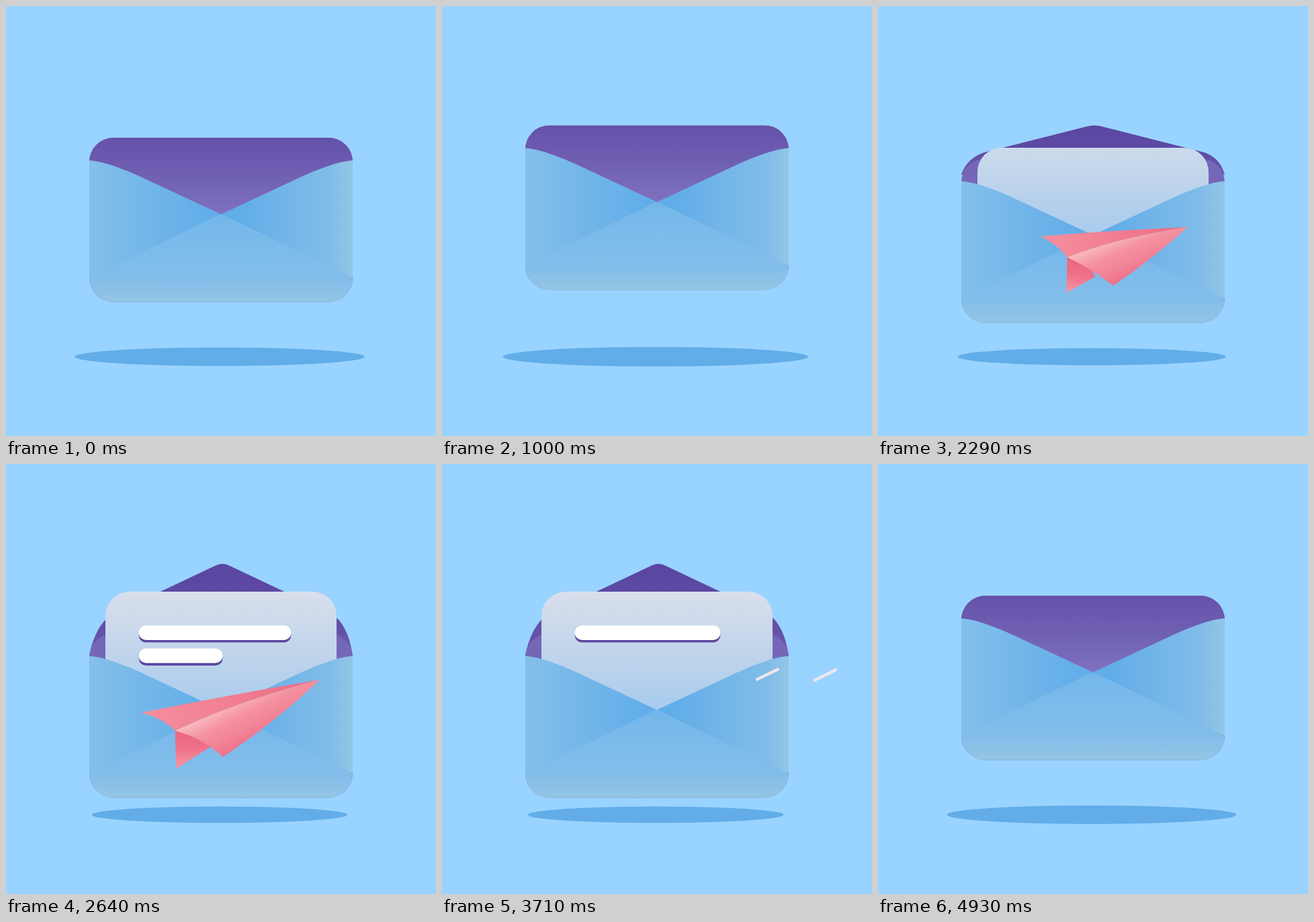
Recreate the animation shown at these times as an HTML page with a canvas. Size 640 by 640 pixels, loop 5000 ms.

```html
<!DOCTYPE html>
<html lang="en">
<head>
<meta charset="utf-8">
<title>Envelope and paper plane</title>
<style>
html, body { margin: 0; width: 100%; height: 100%; overflow: hidden; background: #99d3ff; }
canvas { display: block; width: 100vmin; height: 100vmin; }
</style>
</head>
<body>
<canvas id="stage" width="640" height="640"></canvas>
<script>
const ctx = document.getElementById('stage').getContext('2d');
const LOOP = 5000, STEP = LOOP / 70;
const LEFT = 124, RIGHT = 516, TOP = -114, BOTTOM = 130.5, RADIUS = 36;
const HINGE = -101, PEAK = -217.5;

const ramp = (t, from, to) => Math.min(1, Math.max(0, (t - from) / (to - from)));
const smooth = u => u * u * (3 - 2 * u);
const ease = (t, from, to) => smooth(ramp(t, from, to));
const easeOut = (t, from, to) => 1 - (1 - ramp(t, from, to)) ** 3;

function gradient(x0, y0, x1, y1, ...stops) {
  const g = ctx.createLinearGradient(x0, y0, x1, y1);
  stops.forEach((s, i) => g.addColorStop(i / (stops.length - 1), s));
  return g;
}

function fill(path, style) {
  ctx.fillStyle = style;
  ctx.fill(path instanceof Path2D ? path : new Path2D(path));
}

function roundRect(x, y, w, h, r) {
  const p = new Path2D();
  p.roundRect(x, y, w, h, r);
  return p;
}

function at(x, y, draw) {
  ctx.save();
  ctx.translate(x, y);
  draw();
  ctx.restore();
}

// The envelope's origin is the point where its front folds meet.
const body = roundRect(LEFT, TOP, RIGHT - LEFT, BOTTOM - TOP, RADIUS);
const leftSide = 'M124 -80 C136 -80 160 -74 200 -56 L320 0 L124 95 Z';
const rightSide = 'M516 -80 C504 -80 480 -74 440 -56 L320 0 L516 95 Z';
const bottomSide = 'M320 0 L509 91 Q515 94 516 97 L516 131 L124 131 L124 94 Z';
const closedFlap = 'M124 0 H516 V34 C504 34 480 40 440 58 L320 114 L200 58 C160 40 136 34 124 34 Z';
const openFlap = 'M124 21 C128 -4 140 -32 160 -42 L310 -113 Q322 -120 334 -113 L484 -42 C503 -32 513 -4 516 21 Z';

const envelopeY = t =>
  310 - 21 * easeOut(t, 0, 2000) + 77 * ease(t, 2000, 2468) - 56 * ease(t, 4040, 4600);

function drawShadow(y) {
  const d = y - 310, rx = 215.5 - 0.597 * d + 0.0026 * d * d;
  ctx.fillStyle = '#62ade8';
  ctx.beginPath();
  ctx.ellipse(318, 522, rx, rx * 0.0643, 0, 0, Math.PI * 2);
  ctx.fill();
}

function drawOpenFlap(tip) {
  at(0, HINGE, () => {
    ctx.scale(1, (tip - HINGE) / (PEAK - HINGE));
    fill(openFlap, gradient(0, -116, 0, 21, '#5a46a1', '#5e4ba4', '#6a59ae'));
  });
}

function drawClosedFlap(tip) {
  ctx.save();
  ctx.clip(body);
  ctx.translate(0, TOP);
  ctx.scale(1, 1.02 * (1 - tip / TOP)); // slight overlap hides the seam
  fill(closedFlap, gradient(0, 0, 0, 114, '#6552aa', '#7060b3', '#8072c0'));
  ctx.restore();
}

function drawBars(t) {
  [234, 172].forEach((full, i) => {
    const grow = easeOut(t, 2400 + 100 * i, 2750 + 150 * i);
    const width = full * (grow - ease(t, 3650 - 350 * i, 4010 - 350 * i));
    if (width < 1) return;
    const y = -125.7 + 34.3 * i, r = Math.min(10.5, width / 2);
    fill(roundRect(197.7, y + 3.7, width, 21.6, r), '#5b48a0');
    fill(roundRect(197.7, y, width, 21.6, r), '#fff');
  });
}

function drawEnvelope(t) {
  const tip = PEAK * (ease(t, 2000, 2430) - ease(t, 4060, 4500));
  const letter = -96 - 80 * (ease(t, 2060, 2570) - ease(t, 4040, 4320));
  const open = tip < TOP;
  if (open) drawOpenFlap(tip);
  fill(body, '#7567b8');
  fill(roundRect(148, letter, 344, 70 - letter, RADIUS), gradient(0, -176, 0, 0, '#d9dfec', '#c1d5eb', '#a8cbed'));
  drawBars(t);
  if (!open) drawClosedFlap(tip);
  ctx.clip(body);
  fill(leftSide, gradient(124, 0, 300, 0, '#84c0ea', '#72b6e9', '#62aee9'));
  fill(rightSide, gradient(345, 0, 516, 0, '#60ade8', '#69b1e8', '#72b5e9', '#79b9e9', '#80bce8', '#92c6e6'));
  fill(bottomSide, gradient(0, 0, 0, 130, '#72b7ea', '#79b9ea', '#7ebcea', '#83beea', '#94c5e4'));
}

// Unit plane: nose at the origin, centre fold ending at (1, 0).
// Heading turns it, spread opens the wings.
function drawPlane(heading, size, spread, mirror = 1) {
  const tipX = 0.698 + 0.45 * (1 - spread);
  const fold = 'Q0.55 -0.055 0 0 Z';
  ctx.scale(mirror, 1);
  ctx.rotate(heading * Math.PI / 180);
  ctx.scale(-size, size * spread);
  fill('M1 0 L1.076 0.275 L0.82 0.206 L0.84 0.12 Z', gradient(0.95, 0.02, 1.05, 0.27, '#ec6581', '#ef7189', '#f594a3'));
  fill(`M0 0 Q0.6 -0.122 1.168 -0.217 Q1.05 -0.12 1 0 ${fold}`, gradient(1.1, -0.15, 0.2, 0, '#f48d9e', '#f28093', '#ee7088'));
  fill(`M0 0 Q0.36 0.19 ${tipX} 0.311 Q0.84 0.13 1 0 ${fold}`,
    gradient(0.6, -0.05, 0.55, 0.27, '#f9b6bd', '#f493a2', '#f28598', '#ef738a'));
}

// First the plane passes leftwards behind the envelope.
function drawFarPlane(t) {
  if (t < 70 || t > 990) return;
  const u = (t - 130) / 440;
  at(640 - 500 * u, 106 + 36 * u, () => drawPlane(-14, 148, 1, -1));
}

// Then it returns in front, hovers and leaves to the upper right.
function drawNearPlane(t) {
  if (t < 1600 || t > 3430) return;
  const dive = ease(t, 2000, 2290), climb = ease(t, 2290, 2930);
  const leave = 500 * ramp(t, 2930, 3400) ** 2;
  const x = -6 + 473 * smooth(ramp(t, 1600, 2320) ** 1.6) + leave;
  const y = 290 + 39 * dive - 14 * climb - 0.45 * leave;
  at(x, y, () => drawPlane(13.4 - 27.5 * dive - 9.4 * climb, 262 - 77 * dive + 76 * climb, 0.88 + 0.12 * dive - 0.26 * climb));
}

// Speed lines: head position and length, erased one after another.
function drawStreaks(t) {
  ctx.strokeStyle = '#efe7ee';
  ctx.lineWidth = 4.2;
  ctx.lineCap = 'round';
  [[508, 225, 85], [500, 305.5, 152], [586, 306.5, 77]].forEach(([x, y, length], i) => {
    const start = 3380 + 75 * i;
    const head = length * (1 - ease(t, start - 180, start)), tail = length * (1 - ramp(t, start, start + 330));
    if (head >= tail) return;
    const angle = Math.atan(0.49), dx = Math.cos(angle), dy = Math.sin(angle);
    ctx.beginPath();
    ctx.moveTo(x - tail * dx, y + tail * dy);
    ctx.lineTo(x - head * dx, y + head * dy);
    ctx.stroke();
  });
}

function render(t) {
  const y = envelopeY(t);
  ctx.fillStyle = '#99d3ff';
  ctx.fillRect(0, 0, 640, 640);
  drawShadow(y);
  drawFarPlane(t);
  at(0, y, () => drawEnvelope(t));
  drawStreaks(t);
  drawNearPlane(t);
}

const start = performance.now();
function tick() {
  const t = (performance.now() - start) % LOOP;
  const step = Math.floor((t + 5) / STEP) % 70;
  render(Math.round(step * STEP / 10) * 10);
  requestAnimationFrame(tick);
}
tick();
</script>
</body>
</html>
```
